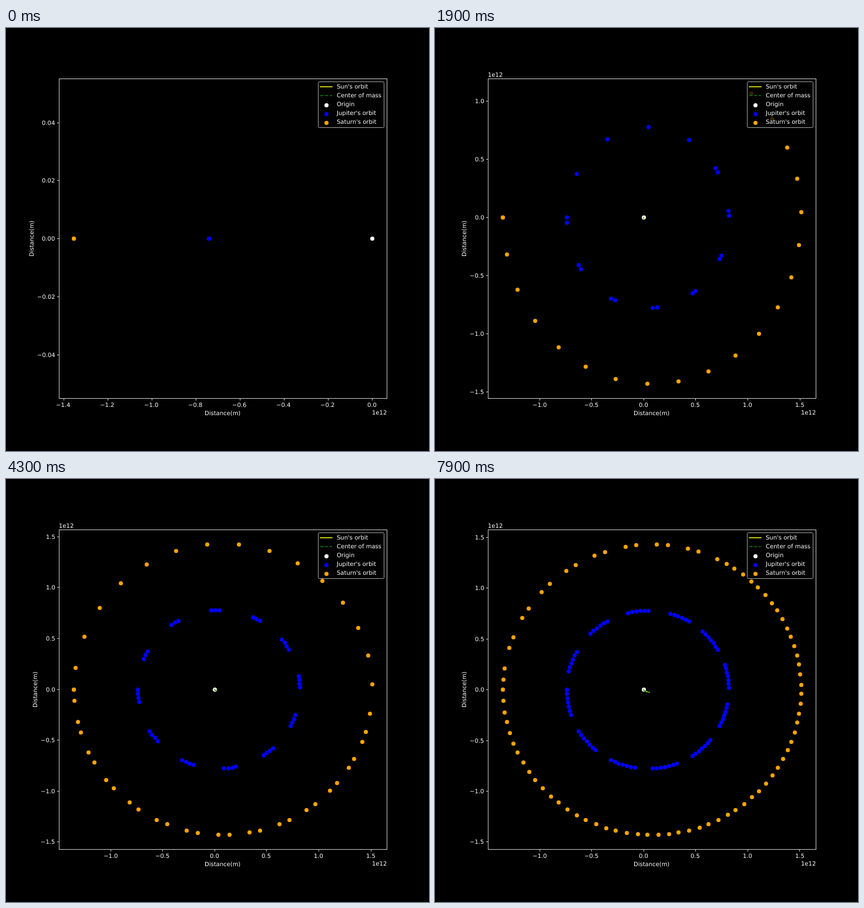
Write an HTML page with a canvas that moves like this. It is 720 px wide and 720 px high and loops after 8 s.

```html
<!DOCTYPE html>
<html lang="en">
<head>
<meta charset="utf-8">
<title>Orbits</title>
<style>
  html, body { margin: 0; width: 100%; height: 100%; overflow: hidden; background: #000; }
  canvas { display: block; }
</style>
</head>
<body>
<canvas id="stage" width="720" height="720"></canvas>
<script>
const ctx = document.getElementById('stage').getContext('2d');
const STEP_MS = 100, STEPS = 80;
const BOX = { left: 90, right: 648, top: 86.4, bottom: 630 };
const MID_X = (BOX.left + BOX.right) / 2, MID_Y = (BOX.top + BOX.bottom) / 2;
const GM = 1.32746e20, YEAR = 365 * 86400;
const TAU = Math.PI * 2;

// Kepler orbit starting at perihelion on the negative x axis; units of 1e12 m, one step per year
function orbit(perihelion, speed) {
  const a = GM / 2 / (GM / perihelion - speed * speed / 2);
  const e = 1 - perihelion / a;
  const rate = Math.sqrt(GM / a ** 3);
  return Array.from({ length: STEPS }, (_, n) => {
    const mean = rate * YEAR * n;
    let E = mean;
    for (let i = 0; i < 12; i++) E = mean + e * Math.sin(E);
    return [-a * (Math.cos(E) - e) / 1e12, -a * Math.sqrt(1 - e * e) * Math.sin(E) / 1e12];
  });
}

const jupiter = orbit(740.52e9, 13720);
const saturn = orbit(1352.55e9, 10180);
const sun = Array.from({ length: STEPS }, (_, n) => {
  const k = n / (STEPS - 1);
  return [0.0565 * k ** 1.61, -0.028 * k ** 0.75];
});

// Data range with a 5 % margin
function limits(values) {
  let lo = Math.min(...values), hi = Math.max(...values);
  if (hi - lo < 1e-9) { lo = -0.05; hi = 0.05; }
  const pad = (hi - lo) * 0.05;
  return [lo - pad, hi + pad];
}

// Round tick values, their labels and the power of ten shown beside the axis
function ticks([lo, hi], scientific) {
  const raw = (hi - lo) / 9;
  const p = 10 ** Math.floor(Math.log10(raw));
  const step = p * [1, 2, 2.5, 5, 10].find(s => s * p >= raw * (1 - 1e-9));
  const outer = step * Math.max(Math.abs(Math.floor(lo / step)), Math.abs(Math.ceil(hi / step)));
  const small = scientific && outer < 0.9999;
  const unit = step * (small ? 10 : 1);
  let digits = 0;
  while (digits < 3 && Math.abs(unit * 10 ** digits - Math.round(unit * 10 ** digits)) > 1e-6) digits++;
  const marks = [];
  for (let i = Math.ceil(lo / step); i * step <= hi; i++) {
    marks.push({ value: i * step, label: (i * unit).toFixed(digits).replace('-', '\u2212') });
  }
  return { marks, power: scientific ? (small ? '1e11' : '1e12') : '' };
}

// Text starts on a whole pixel; anchor is 0 for left, 0.5 for centre, 1 for right
function text(str, x, y, anchor = 0) {
  ctx.fillStyle = '#fff';
  ctx.fillText(str, Math.round(x - anchor * ctx.measureText(str).width), Math.round(y));
}

// Dots sit on pixel centres
function dot(x, y, color) {
  ctx.fillStyle = color;
  ctx.beginPath();
  ctx.arc(Math.round(x) + 0.5, Math.round(y) + 0.5, 3.5, 0, TAU);
  ctx.fill();
}

function line(points, color, width, dash = [], cap = 'butt') {
  ctx.strokeStyle = color;
  ctx.lineWidth = width;
  ctx.lineCap = cap;
  ctx.setLineDash(dash);
  ctx.beginPath();
  points.forEach(([x, y], i) => i ? ctx.lineTo(x, y) : ctx.moveTo(x, y));
  ctx.stroke();
  ctx.setLineDash([]);
}

const sunLine = points => line(points, '#ff0', 1.5, [], 'square');
const massLine = points => line(points, '#008000', 1.5, [5.55, 2.4]);

function drawAxes(xs, ys, px, py) {
  ctx.strokeStyle = '#ccc';
  ctx.lineWidth = 1;
  ctx.strokeRect(90.5, 86.5, 558, 544);

  for (const { value, label } of xs.marks) {
    const x = px(value), tx = Math.round(x) + 0.5;
    line([[tx, 630.5], [tx, 634]], '#ccc', 1);
    text(label, x, 645, 0.5);
  }
  let widest = 0;
  for (const { value, label } of ys.marks) {
    const y = py(value), ty = Math.round(y) + 0.5;
    line([[87, ty], [90.5, ty]], '#ccc', 1);
    text(label, 83.5, y + 4, 1);
    widest = Math.max(widest, ctx.measureText(label).width);
  }
  text(xs.power, 648.5, 658, 1);
  text(ys.power, BOX.left, 83);
  text('Distance(m)', MID_X, 659, 0.5);

  ctx.save();
  ctx.translate(Math.round(77.5 - widest), Math.round(MID_Y));
  ctx.rotate(-Math.PI / 2);
  text('Distance(m)', 0, 0, 0.5);
  ctx.restore();
}

function drawLegend() {
  ctx.fillStyle = 'rgba(0,0,0,0.8)';
  ctx.strokeStyle = 'rgba(204,204,204,0.8)';
  ctx.lineWidth = 1;
  ctx.beginPath();
  ctx.roundRect(531.5, 91.5, 112, 78, 2);
  ctx.fill();
  ctx.stroke();

  sunLine([[535, 100], [555, 100]]);
  massLine([[535, 115], [555, 115]]);
  dot(545, 131, '#fff');
  dot(545, 146, '#00f');
  dot(545, 161, '#ffa500');
  ["Sun's orbit", 'Center of mass', 'Origin', "Jupiter's orbit", "Saturn's orbit"]
    .forEach((label, i) => text(label, 563, 103 + 15 * i));
}

function draw(step) {
  const trail = body => body.slice(0, step + 1);
  const all = [[0, 0], ...trail(jupiter), ...trail(saturn), ...trail(sun)];
  const xl = limits(all.map(p => p[0]));
  // The first view has no vertical extent yet
  const yl = step ? limits(all.map(p => p[1])) : limits([0]);
  const px = x => BOX.left + (x - xl[0]) / (xl[1] - xl[0]) * (BOX.right - BOX.left);
  const py = y => BOX.bottom - (y - yl[0]) / (yl[1] - yl[0]) * (BOX.bottom - BOX.top);
  const mark = color => ([x, y]) => dot(px(x), py(y), color);
  // The starting dot is laid down twice, which firms up its edge
  const marks = (body, color) => [body[0], ...trail(body)].forEach(mark(color));

  ctx.fillStyle = '#000';
  ctx.fillRect(0, 0, 720, 720);
  ctx.font = '10px "DejaVu Sans", sans-serif';
  ctx.textRendering = 'geometricPrecision';

  mark('#fff')([0, 0]);
  marks(jupiter, '#00f');
  marks(saturn, '#ffa500');
  if (step) {
    const path = trail(sun).map(([x, y]) => [px(x), py(y)]);
    sunLine(path);
    massLine(path);
  }
  drawAxes(ticks(xl, true), ticks(yl, step > 0), px, py);
  drawLegend();
}

let shown = -1;
function tick() {
  const step = Math.floor(performance.now() / STEP_MS) % STEPS;
  if (step !== shown) draw(shown = step);
  requestAnimationFrame(tick);
}
tick();
</script>
</body>
</html>
```
